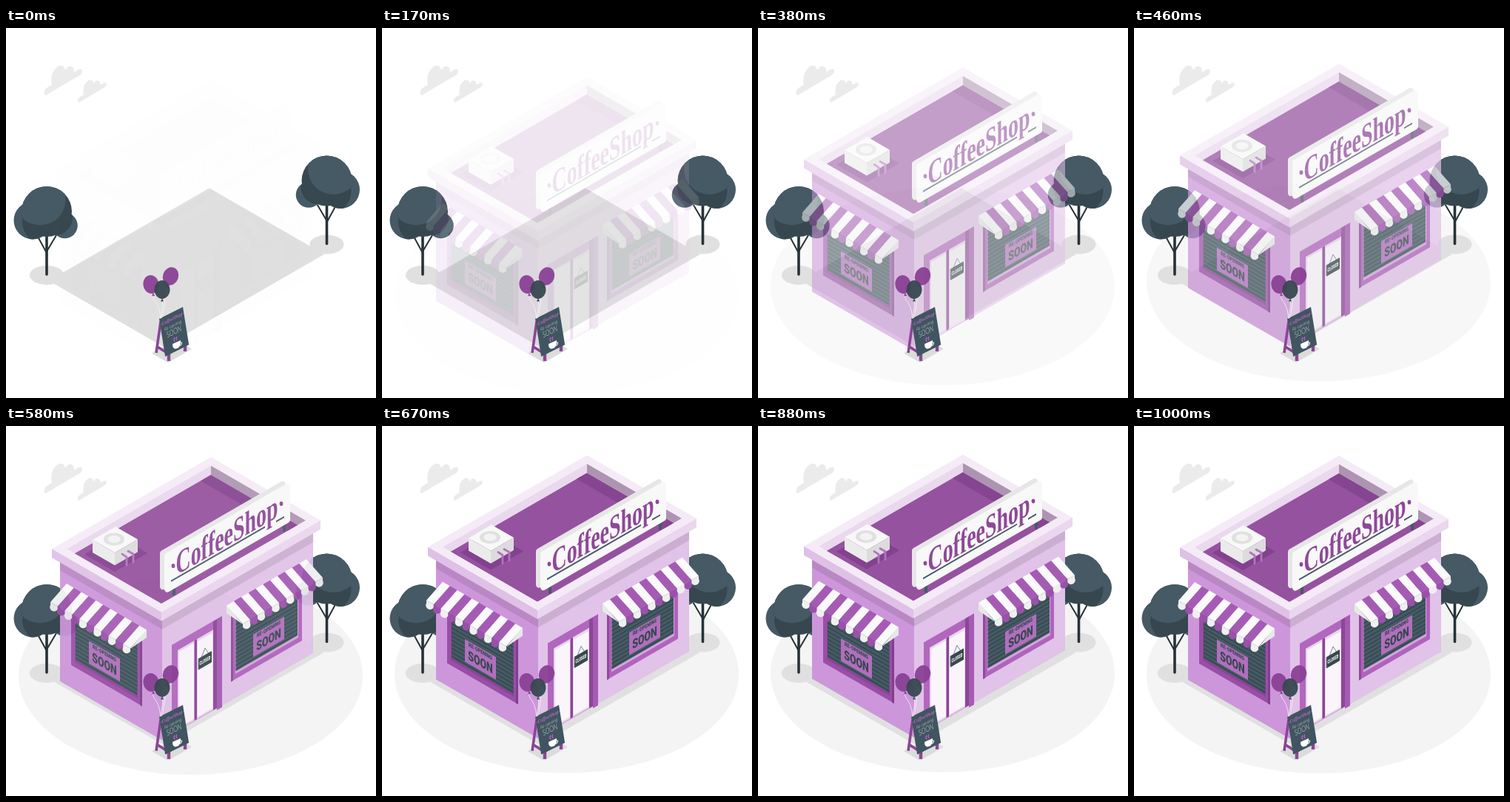
These frames come from a looping animation (500x500 px, 1040 ms). An HTML page:

```html
<!DOCTYPE html>
<html>
<head>
<meta charset="utf-8">
<style>
html, body { margin: 0; width: 100%; height: 100%; overflow: hidden; background: #fff; }
svg { display: block; width: 100vw; height: 100vh; }
</style>
</head>
<body>
<svg id="stage" viewBox="0 0 500 500"></svg>
<script>
const SLOPE = 0.577; // isometric axes rise and fall by tan 30°
const SANS = "Roboto, 'Liberation Sans', sans-serif";
const SERIF = "'Liberation Serif', serif";
const LIGHT = "Lato, 'Open Sans', sans-serif";
const MIDDLE = 'text-anchor="middle" font-weight="900"';
const ROUND = 'stroke-linejoin="round" stroke-linecap="round"';
const MIRROR = 'transform="translate(488 -33) scale(-1 1)"';

const path = (d, fill, extra = '') => `<path d="${d}" fill="${fill}" ${extra}/>`;
const line = (d, color, width, extra = '') => path(d, 'none', `stroke="${color}" stroke-width="${width}" ${extra}`);
const oval = (x, y, rx, ry, fill, extra = '') =>
  `<ellipse cx="${x}" cy="${y}" rx="${rx}" ry="${ry}" fill="${fill}" ${extra}/>`;

// Upright face from its top left corner; dir 1 falls to the right, -1 rises
const wall = (x, y, w, h, dir, fill, extra) =>
  path(`M${x} ${y}l${w} ${dir * w * SLOPE}v${h}l${-w} ${-dir * w * SLOPE}z`, fill, extra);
// Level face from its back corner, a wide to the right and b wide to the left
const slab = (x, y, a, b, fill, extra) =>
  path(`M${x} ${y}l${a} ${a * SLOPE}l${-b} ${b * SLOPE}l${-a} ${-a * SLOPE}z`, fill, extra);
const box = (x, y, a, b, h, [top, left, right]) =>
  slab(x, y, a, b, top) +
  wall(x - b, y + b * SLOPE, a, h, 1, left) +
  wall(x + a - b, y + (a + b) * SLOPE, b, h, -1, right);

const text = (str, matrix, size, font, fill, extra = '') =>
  `<text transform="matrix(${matrix})" font-size="${size}" font-family="${font}" fill="${fill}" ${extra}>${str}</text>`;
const wallText = (str, x, y, size, sx, dir, font, fill, extra) =>
  text(str, [sx, dir * sx * SLOPE, 0, 1, x, y], size, font, fill, extra);

// Ball of leaves, lit or shaded where a second circle overlaps it
function leaves(x, y, r, base, x2, y2, r2, overlap) {
  const id = 'ball' + x;
  return `<clipPath id="${id}"><circle cx="${x}" cy="${y}" r="${r}"/></clipPath>` +
    oval(x, y, r, r, base) + oval(x2, y2, r2, r2, overlap, `clip-path="url(#${id})"`);
}

function tree() {
  const lit = '#455a64', shade = '#37474f';
  return oval(55, 334, 23, 13, '#e0e0e0') +
    line('M55 275V333', '#263238', 3.6, ROUND) +
    line('M43 282L55 304M68 280L55 302', '#263238', 2) +
    leaves(36, 260, 25.5, lit, 53, 262, 31, shade) +
    leaves(79.5, 267, 17.3, lit, 66, 256, 24, shade) +
    leaves(55, 248, 34, shade, 46, 232, 34.5, lit);
}

function shopWindow(frame, edge, sill) {
  let s = wall(88, 230, 96, 91, 1, frame) + wall(181, 284, 3, 91, 1, edge) +
    wall(93, 240, 85, 77, 1, sill) + wall(94, 240, 83.5, 74, 1, '#455a64');
  for (let y = 245; y < 313; y += 5.5) s += wall(94, y, 83.5, 1.5, 1, '#34444c');
  return s + wall(112, 288.5, 42, 30.5, 1, '#b06fbd');
}

function awning() {
  const dx = 9.82, dy = dx * SLOPE;
  let s = path('M190 273v11l-22 15z', '#e8e8e8');
  for (let i = 0; i < 11; i++) {
    const x = 60 + dx * i, y = 236 + dy * i;
    const [top, hang] = i % 2 ? ['#a55bb4', '#9b50aa'] : ['#fafafa', '#f0f0f0'];
    s += path(`M${x} ${y}l22 -25l${dx} ${dy}l-22 25z`, top) +
      path(`M${x} ${y}l${dx} ${dy}v4a5 5 0 0 1 ${-dx} ${-dy}z`, hang);
  }
  return s;
}

const poster = (x, y, dir) =>
  wallText('RE-OPENING', x, y, 7.4, 0.73, dir, SANS, '#37474f', MIDDLE) +
  wallText('SOON', x, y + 18, 17.5, 0.71, dir, SANS, '#37474f', MIDDLE);

function roof() {
  return box(277, 40, 148, 215, 12, ['#f5ebf7', '#dfc0e6', '#ead6ee']) +
    `<clipPath id="opening">${slab(277, 51.5, 128, 195)}</clipPath><g clip-path="url(#opening)">` +
    slab(277, 51.5, 128, 195, '#ead8ee') +
    slab(277, 64, 128, 195, '#95529f') +
    slab(277, 64, 128, 14, '#864591') +
    wall(277, 51.5, 128, 12.5, 1, '#ad95b2') +
    slab(150, 146, 41, 44, '#834190') + '</g>';
}

function airUnit() {
  return box(148, 134, 30, 31, 17, ['#f8f8f8', '#ebebeb', '#dcdcdc']) +
    oval(146, 151, 14, 8.5, '#e0e0e0') + oval(146, 151, 8.5, 5, '#f3f3f3') +
    line('M157 171l6 4v11M165 167l7 4v11', '#b571c2', 2.8, ROUND);
}

function sign() {
  const panel = (x, y, color) =>
    wall(x, y, 162, 45, -1, color, `stroke="${color}" stroke-width="8" ${ROUND}`);
  const dot = (x, y) => oval(x, y, 2.4, 3, '#8d4898');
  return line('M227 214v13M376 127v14', '#455a64', 4) +
    panel(212, 170, '#e6e6e6') + panel(218, 173.5, '#f8f8f8') +
    wall(223, 206.5, 127, 2.2, -1, '#455a64') + wall(365, 126, 11, 2.2, -1, '#455a64') +
    dot(226, 187) + dot(372, 103) +
    wallText('CoffeeShop', 229.5, 200, 45, 0.62, -1, SERIF, '#8d4898', 'font-weight="bold"');
}

function door() {
  const pane = (x, y, w) => wall(x, y, w, 102, -1, '#faf5fb');
  return wall(224, 294, 68, 120, -1, '#b267bf') +
    wall(280, 262, 5, 120, -1, '#8c4797') +
    wall(285, 259, 7, 123, -1, '#a65ab3') +
    wall(232, 301, 48, 108, -1, '#ead5ee') +
    pane(234, 303, 20) + pane(259, 289, 20) +
    wall(254.5, 288, 3.5, 108, -1, '#8a4695') +
    line('M264 311L269 298L273.500 305', '#455a64', 0.7) +
    wall(260.5, 312.5, 17, 14.3, -1, '#37474f', `stroke="#37474f" ${ROUND}`) +
    wallText('CLOSED', 269, 317.2, 7, 0.58, -1, SANS, '#fff', MIDDLE);
}

function shop() {
  const mirrored = part => `<g ${MIRROR}>${part}</g>`;
  return box(277, 63.3, 138, 204, 162, ['none', '#cd96da', '#e1c2e8']) +
    box(277, 63.3, 138, 204, 12, ['none', '#b988c4', '#ccaed2']) +
    shopWindow('#9a4ea8', '#7f3f8a', '#8b4596') +
    mirrored(shopWindow('#b063bd', '#8f4b9a', '#d3a5dc')) +
    door() + awning() + mirrored(awning()) +
    poster(133, 307.5, 1) + poster(355, 274.5, -1) +
    roof() + airUnit() + sign();
}

function board() {
  const line3 = (str, y, size, sx, font, fill, extra) =>
    text(str, [sx, 0, 0, 1, 16, y], size, font, fill, 'text-anchor="middle" ' + extra);
  return slab(229, 421, 22, 32, '#dcdcdc') +
    line('M209 397L203 439M205 431L216 438', '#8a4695', 3.6) +
    line('M220 438v12M242 428v9', '#8a4695', 4.4) +
    '<g transform="matrix(1 -.5 .16 1 207 393)">' +
    '<rect width="32" height="51" fill="#415560"/>' +
    line3('·CoffeeShop·', 10, 6.3, 0.92, SERIF, '#b968c6', 'font-style="italic" font-weight="bold"') +
    line3('Re-opening', 19, 6.2, 0.82, LIGHT, '#d8dddf', 'font-style="italic" font-weight="300"') +
    line3('SOON', 29, 11, 0.62, LIGHT, '#d8dddf', 'font-weight="300"') + '</g>' +
    path('M225 427l11 -5q1 9 -5 11t-6 -6z', '#fff') +
    line('M235.500 425q3 -1 2 2t-3 2', '#fff', 1) +
    line('M228 424q-2 -3 0 -6M231 422q-2 -3 0 -5', '#b65cc4', 1.4);
}

const balloon = (x, y, turn, fill) =>
  `<g transform="translate(${x} ${y}) rotate(${turn})" opacity=".94">` +
  oval(0, 0, 10.5, 12.5, fill) + path('M0 11.500l2 4.500h-4z', fill) + '</g>';

function balloons() {
  return line('M199 360q-2 4 3 10t7 23M211 369q2 6 0 11t-1 12M217 348q-2 20 -3 27t-4 17', '#f3f3f3', 0.8) +
    balloon(196, 346.5, -12, '#8a4095') +
    balloon(222.5, 335.5, 20, '#8a4095') +
    balloon(211, 353.5, 0, '#37474f');
}

const cloud = path('M52 90Q50 85 55 81L62 77Q59 60 70 52Q78 48 80 57Q86 48 91 54Q93 57 92 60' +
  'Q101 53 103 57Q104 62 96 66L57 89Q53 92 52 90Z', '#ebebeb');

stage.innerHTML =
  `<g class="rise">${oval(249.5, 335.5, 232.5, 134, '#f4f4f4')}</g>` +
  slab(275, 217, 154, 216, '#e0e0e0', `stroke="#e0e0e0" ${ROUND}`) +
  cloud + `<g transform="translate(58 32) scale(.755)">${cloud}</g>` +
  `<g id="tree">${tree()}</g>` +
  '<use href="#tree" transform="translate(488.500 -41.500) scale(-1 1)"/>' +
  `<g class="rise">${shop()}</g>` +
  board() + balloons();

// cubic-bezier(.36, -.01, .5, 1.38): overshoots before settling
function ease(p) {
  if (p >= 1) return 1;
  const curve = (s, a, b) => 3 * a * s * (1 - s) ** 2 + 3 * b * s * s * (1 - s) + s ** 3;
  let lo = 0, hi = 1;
  for (let i = 0; i < 30; i++) {
    const mid = (lo + hi) / 2;
    if (curve(mid, 0.36, 0.5) < p) lo = mid; else hi = mid;
  }
  return curve(lo, -0.01, 1.38);
}

const LOOP = 1040, FPS = 24, LEAD = 0.8; // the rise is already under way by part of a step
const risers = document.querySelectorAll('.rise');
const start = performance.now();

function draw() {
  const t = (performance.now() - start) % LOOP;
  const step = Math.floor((t + 5) * FPS / 1000);
  const k = ease((step + LEAD) / FPS);
  for (const g of risers) {
    g.setAttribute('transform', `translate(0 ${30 * (1 - k)})`);
    g.setAttribute('opacity', Math.max(0, Math.min(1, k)));
  }
  requestAnimationFrame(draw);
}
draw();
</script>
</body>
</html>
```
